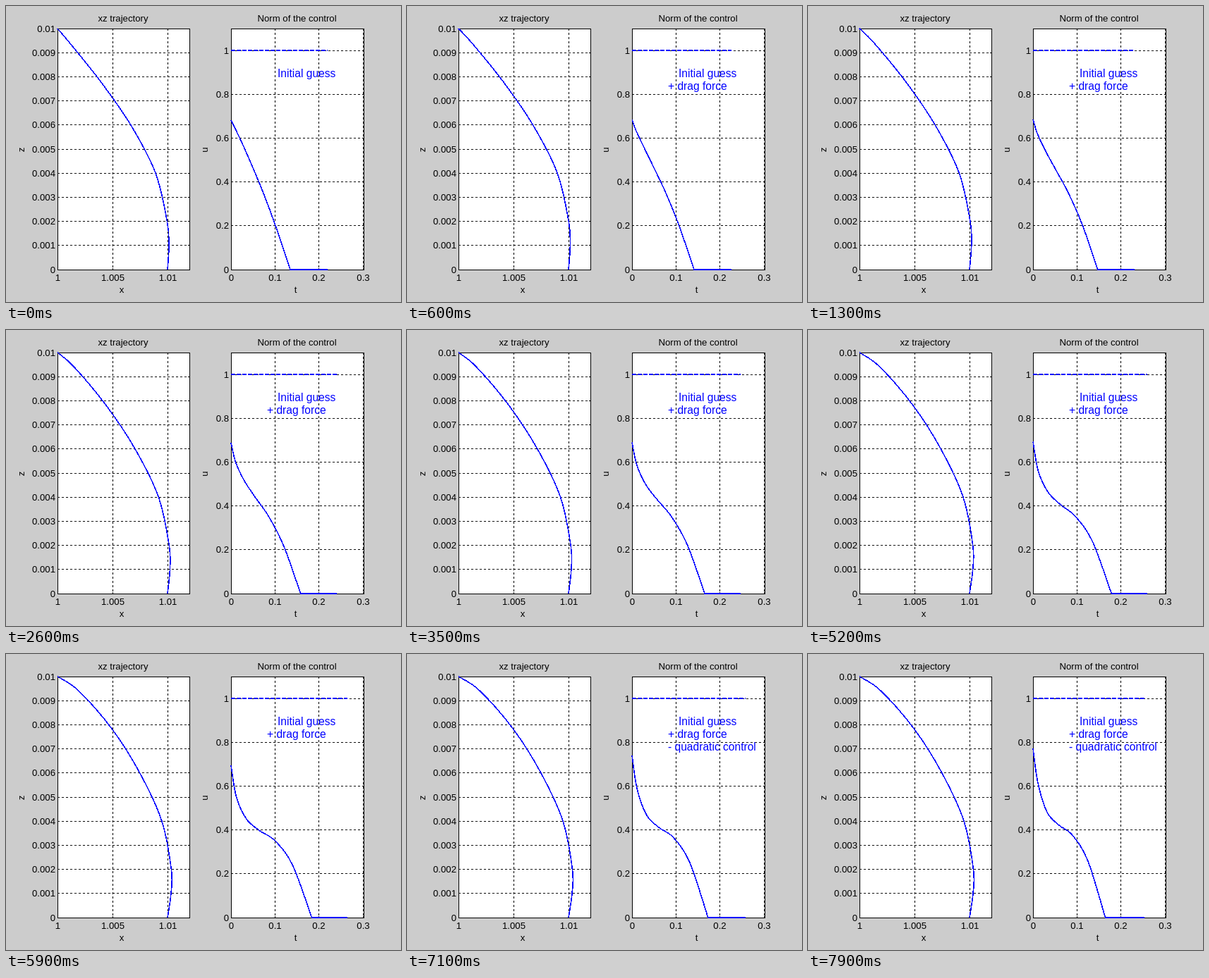
Recreate the animation shown at these times as an HTML page. Size 560 by 420 pixels, loop 8 s.

```html
<!DOCTYPE html>
<html>
<head>
<meta charset="utf-8">
<style>
html, body { margin: 0; width: 100%; height: 100%; overflow: hidden; background: #ccc; }
svg { display: block; font: 13.2px "Liberation Sans", Arial, sans-serif; }
path, rect { shape-rendering: crispEdges; fill: none; }
.axis { stroke: #000; }
.grid { stroke: #000; stroke-dasharray: 3 3; }
.curve { stroke: #00f; stroke-width: 1.6; stroke-linejoin: round; }
.note { fill: #00f; font-size: 15.6px; }
</style>
</head>
<body>
<svg width="560" height="420" viewBox="0 0 560 420">
  <g id="axes"></g>
  <path id="limit" class="curve" stroke-dasharray="6 2"/>
  <path id="control" class="curve"/>
  <path id="trajectory" class="curve"/>
  <text class="note" x="385" y="100.5">Initial guess</text>
  <text class="note" x="370" y="118.8" id="drag">+ drag force</text>
  <text class="note" x="370" y="137" id="quad">- quadratic control</text>
</svg>
<script>
const TOP = 32, BOTTOM = 374, LEFT_X = 73, RIGHT_X = 319, WIDTH = 187.4;
const LOOP = 8000, STEP = 100, QUAD_START = 6000, LAST = 7900;
const $ = id => document.getElementById(id);

// ---- static axes ----
function text(x, y, s, anchor = 'middle', extra = '') {
  return `<text x="${x}" y="${y}" text-anchor="${anchor}" ${extra}>${s}</text>`;
}

// xMax and yMax are in tick units; each tick is one unit
function axes(left, right, xMax, xLabels, yMax, yLabels, title, xName, yName, nameX) {
  const mid = (left + right) / 2 - 0.5;
  let grid = '', ticks = '', labels = '';
  xLabels.forEach((s, k) => {
    const x = Math.floor(left + WIDTH * k / xMax) + 0.5;
    if (x > left + 1 && x < right) grid += `M${x} ${TOP}V${BOTTOM}`;
    ticks += `M${x} ${BOTTOM}v-2M${x} ${TOP}v3`;
    labels += text(x, 390, s);
  });
  yLabels.forEach((s, k) => {
    const y = Math.floor(BOTTOM - (BOTTOM - TOP) * k / yMax) + 0.5;
    if (y > TOP + 1 && y < BOTTOM) grid += `M${left} ${y}H${right}`;
    ticks += `M${left} ${y}h3M${right} ${y}h-2`;
    labels += text(left - 3, y + 4.5, s, 'end');
  });
  return `<rect x="${left + 0.5}" y="${TOP + 0.5}" width="${right - left}" height="${BOTTOM - TOP}" class="axis" style="fill:#fff"/>
    <path class="grid" d="${grid}"/><path class="axis" d="${ticks}"/>` + labels +
    text(mid, 22, title) + text(mid - 2, 407, xName) +
    text(nameX, 204, yName, 'middle', `transform="rotate(-90 ${nameX} 204)"`);
}

const scale = (count, unit, from = 0) =>
  Array.from({ length: count }, (_, k) => +(from + k * unit).toFixed(3));

$('axes').innerHTML =
  axes(LEFT_X, 260, 2.4, scale(3, 0.005, 1), 10, scale(11, 0.001), 'xz trajectory', 'x', 'z', 26) +
  axes(RIGHT_X, 507, 3, scale(4, 0.1), 5.5, scale(6, 0.2), 'Norm of the control', 't', 'u', 286);

// ---- curves ----
// Each pose: horizon end, switch-off x, trajectory x at HEIGHTS,
// and control y at steps that widen towards the switch-off.
const HEIGHTS = [TOP, 52, 107, 169, 237, 306, 340, BOTTOM];
const guess = {
  end: [456], off: [403],
  path: [73, 90, 134, 177, 212, 228.5, 231, 229],
  control: [162, 173.5, 195.5, 226.5, 265, 314, BOTTOM]
};
const dragged = {
  end: [484], off: [434],
  path: [73, 103, 151, 190, 221, 234.5, 234, 229],
  control: [158, 204, 235, 251, 265, 299, BOTTOM]
};
const relaxed = {
  end: [477], off: [421.5],
  path: dragged.path,
  control: [134, 183, 224, 242.5, 257, 294, BOTTOM]
};

function blend(a, b, f) {
  const pose = {};
  for (const key in a) pose[key] = a[key].map((v, i) => v + (b[key][i] - v) * f);
  return pose;
}

function poseAt(t) {
  return t < QUAD_START
    ? blend(guess, dragged, (t / QUAD_START) ** 0.9)
    : blend(dragged, relaxed, (t - QUAD_START) / (LAST - QUAD_START));
}

// smooth path through the points
function spline(p) {
  let d = `M${p[0]}`;
  for (let i = 0; i < p.length - 1; i++) {
    const a = p[i], b = p[i + 1], before = p[i - 1] || a, after = p[i + 2] || b;
    const c1 = a.map((v, j) => v + (b[j] - before[j]) / 6);
    const c2 = b.map((v, j) => v - (after[j] - a[j]) / 6);
    d += `C${c1} ${c2} ${b}`;
  }
  return d;
}

function draw(now) {
  const t = Math.floor(now % LOOP / STEP) * STEP;
  const { end, off, path, control } = poseAt(t);
  const points = control.map((y, k) =>
    [RIGHT_X + (off[0] - RIGHT_X) * (k / (control.length - 1)) ** 1.5, y]);

  $('trajectory').setAttribute('d', spline(path.map((x, k) => [x, HEIGHTS[k]])));
  $('control').setAttribute('d', spline(points) + `H${end}`);
  $('limit').setAttribute('d', `M${RIGHT_X} 63H${end}`);
  $('drag').style.display = t > 0 ? '' : 'none';
  $('quad').style.display = t > QUAD_START ? '' : 'none';
}

const start = performance.now();
function frame() {
  draw(performance.now() - start);
  requestAnimationFrame(frame);
}
frame();
</script>
</body>
</html>
```
